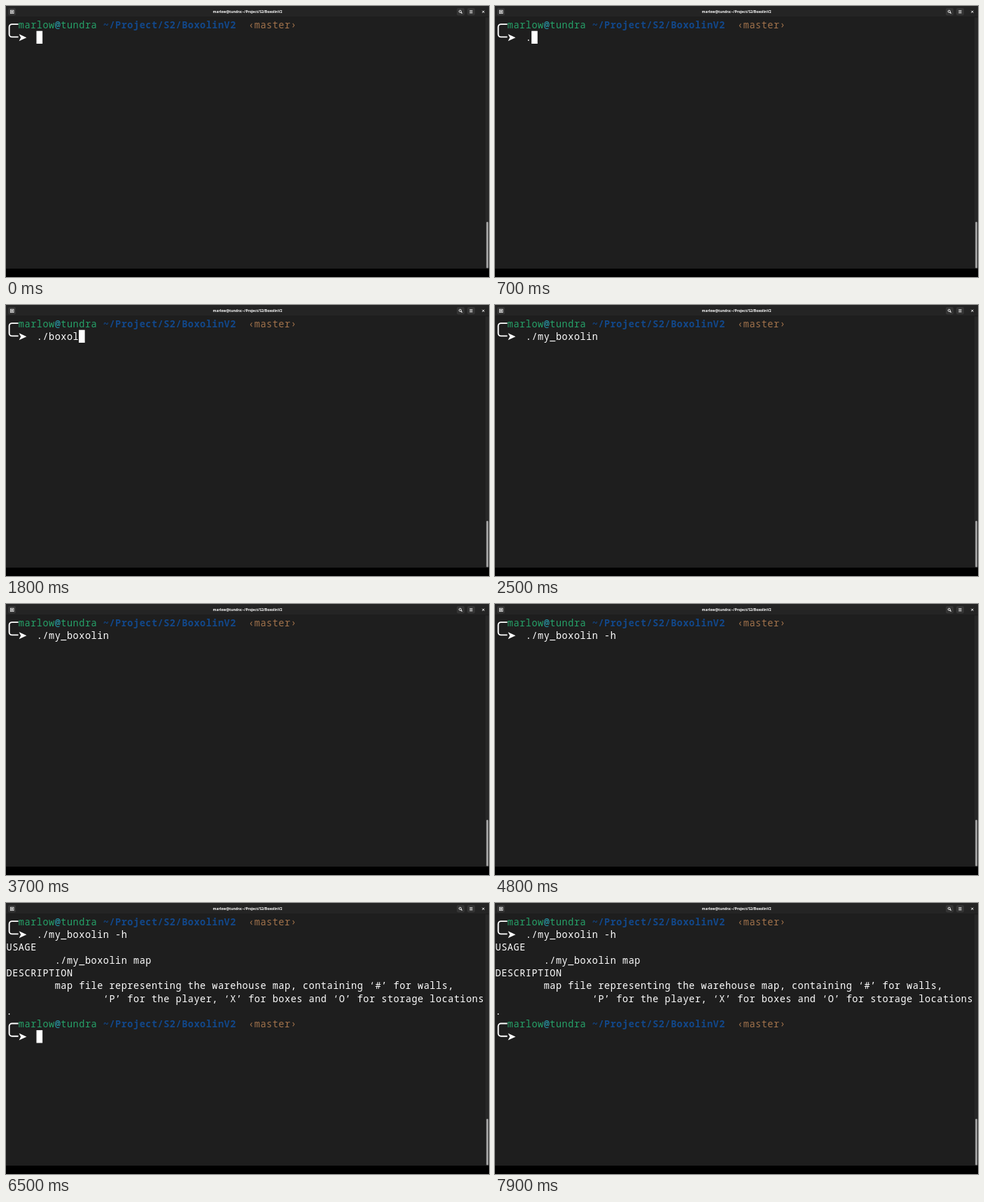
Write an HTML page with a canvas that moves like this. It is 690 by 388 pixels and loops after 8000 ms.

```html
<!DOCTYPE html>
<html lang="en">
<head>
<meta charset="utf-8">
<title>Terminal</title>
<style>
  html, body { margin: 0; width: 100%; height: 100%; overflow: hidden; background: #1e1e1e; }
  canvas { display: block; width: 690px; height: 388px; }
</style>
</head>
<body>
<canvas id="stage" width="690" height="388"></canvas>
<script>
const ctx = document.getElementById('stage').getContext('2d');
const LOOP = 8000;
const CELL = 8.64, ROW = 18.3, LEFT = 0.3, TOP = 17.4;
const MONO = '13.5px "Noto Sans Mono", monospace';
const WHITE = '#fff', GREEN = '#26a269', CYAN = '#2aa1b3', BLUE = '#12488b', YELLOW = '#a2734c';
const USER = 'marlow', HOST = 'tundra', PATH = '~/Project/S2/BoxolinV2';

// [time, command line after that key press]
const typing = [
  [0, ''], [600, '.'], [900, './'], [1100, './b'], [1200, './bo'], [1300, './box'],
  [1500, './boxo'], [1800, './boxol'], [2000, './my_boxolin '],
  [4000, './my_boxolin -'], [4200, './my_boxolin -h']
];
const ENTER = 4900;
// Each entry flips the cursor, which starts visible
const blinks = [400, 600, 2500, 3100, 3700, 4000, 4800, 4900, 5500, 6100, 6700, 7300, 7900];

const help = [
  [2, 0, 'USAGE'],
  [3, 8, './my_boxolin map'],
  [4, 0, 'DESCRIPTION'],
  [5, 8, 'map file representing the warehouse map, containing ‘#’ for walls,'],
  [6, 16, '‘P’ for the player, ‘X’ for boxes and ‘O’ for storage locations'],
  [7, 0, '.']
];

const colX = col => LEFT + col * CELL;
const rowY = row => TOP + row * ROW;

function rect(x, y, w, h, color, r = 0) {
  ctx.fillStyle = color;
  ctx.beginPath();
  ctx.roundRect(x, y, w, h, r);
  ctx.fill();
}

function line(points, width, color = WHITE) {
  ctx.strokeStyle = color;
  ctx.lineWidth = width;
  ctx.beginPath();
  points.forEach(([x, y], i) => i ? ctx.lineTo(x, y) : ctx.moveTo(x, y));
  ctx.stroke();
}

// Every character is centred in its own terminal cell
function print(row, col, text, color = WHITE, weight = '') {
  ctx.font = `${weight} ${MONO}`;
  ctx.textAlign = 'center';
  ctx.fillStyle = color;
  [...text].forEach((ch, i) => ctx.fillText(ch, colX(col + i + 0.5), rowY(row) + 14.3));
}

function prompt(row) {
  const y1 = rowY(row) + 8.7, y2 = y1 + ROW, x = colX(0.5), end = colX(2);
  ctx.strokeStyle = WHITE;
  ctx.lineWidth = 1.9;
  ctx.beginPath();
  ctx.moveTo(end, y1);
  ctx.arcTo(x, y1, x, y2, 4);
  ctx.arcTo(x, y2, end, y2, 4);
  ctx.lineTo(end, y2);
  ctx.stroke();

  ctx.fillStyle = WHITE;
  ctx.beginPath();
  ctx.moveTo(18.6, y2 - 4.2);
  ctx.lineTo(29.4, y2 + 0.8);
  ctx.lineTo(18.6, y2 + 5.8);
  ctx.lineTo(21.2, y2 + 0.8);
  ctx.fill();

  print(row, 2, USER, GREEN);
  print(row, 8, '@', CYAN);
  print(row, 9, HOST, GREEN);
  print(row, 16, PATH, BLUE, 'bold');
  print(row, 40, '‹master›', YELLOW);
}

function titleBar() {
  rect(0, 0, 690, 16, '#242424');
  rect(0, 15.4, 690, 0.8, '#191919');
  for (const x of [3, 644, 659]) rect(x, 3, 11, 10.5, '#343434', 2);

  // New tab
  ctx.strokeStyle = '#eee';
  ctx.lineWidth = 0.9;
  ctx.strokeRect(6.4, 6.2, 4.6, 4.4);
  line([[8.7, 6.9], [8.7, 9.9]], 0.9);
  line([[7.2, 8.4], [10.2, 8.4]], 0.9);

  // Search
  ctx.strokeStyle = WHITE;
  ctx.beginPath();
  ctx.arc(648.8, 7.8, 1.6, 0, Math.PI * 2);
  ctx.stroke();
  line([[650, 9], [651.6, 10.6]], 1.1);

  // Menu and close
  for (const y of [6.6, 8.3, 10]) line([[662.3, y], [666.5, y]], 0.8);
  line([[680.3, 6.8], [683.3, 9.8]], 1);
  line([[683.3, 6.8], [680.3, 9.8]], 1);

  ctx.font = 'bold 5px "Noto Sans", sans-serif';
  ctx.textAlign = 'center';
  ctx.fillStyle = WHITE;
  ctx.fillText(`${USER}@${HOST}:${PATH}`, 345, 10);
}

function draw(t) {
  rect(0, 0, 690, 388, '#1e1e1e');
  rect(685, 16, 5, 360, '#272727');
  rect(686.2, 309, 2.8, 66.5, '#a4a4a4', 1.4);
  rect(0, 376, 690, 12, '#000');
  titleBar();

  const command = typing.filter(([at]) => at <= t).pop()[1];
  const done = t >= ENTER;
  prompt(0);
  print(1, 5, command);
  if (done) {
    help.forEach(entry => print(...entry));
    prompt(8);
  }

  const visible = blinks.filter(at => at <= t).length % 2 === 0;
  if (visible) {
    const col = done ? 5 : 5 + command.length;
    rect(colX(col), rowY(done ? 9 : 1), CELL, ROW, WHITE);
  }
}

const start = performance.now();
function tick() {
  draw((performance.now() - start) % LOOP);
  requestAnimationFrame(tick);
}
tick();
</script>
</body>
</html>
```
